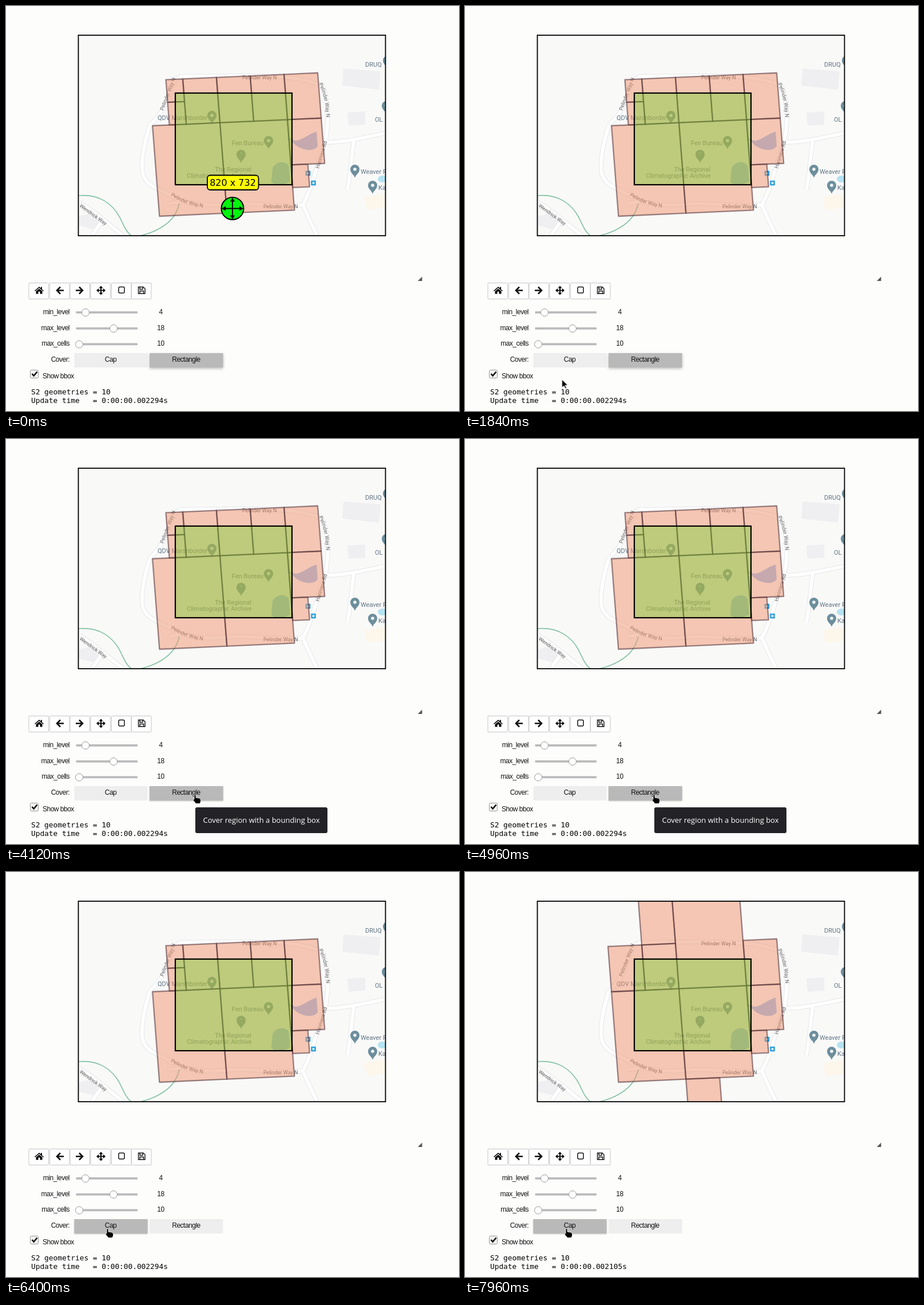
An HTML page that plays this animation: 792x707 px, repeating every 8 s.

```html
<!DOCTYPE html>
<html lang="en">
<head>
<meta charset="utf-8">
<title>Map covering demo</title>
<style>
html, body { margin: 0; width: 100%; height: 100%; overflow: hidden; background: #fdfdfc; }
svg { display: block; width: 792px; height: 707px; }
text { white-space: pre; }

.ui text { font: 12px "Liberation Sans", Arial, sans-serif; letter-spacing: -.5px; fill: #111; }
.end { text-anchor: end; }
.mid { text-anchor: middle; }
.out text { font: 12.8px "DejaVu Sans Mono", monospace; }
.place text { font: 11px Roboto, sans-serif; fill: #5f7484; }
.street text { font: 9px Roboto, sans-serif; fill: #606060; }
.edge { fill: none; stroke: #e6e7ea; stroke-width: 8; }
.road { fill: none; stroke: #fefefe; stroke-width: 6; }
.cell { fill: rgba(240, 148, 112, .5); stroke: rgba(65, 35, 45, .52); stroke-width: 2.3; stroke-linejoin: round; }
.icon { fill: none; stroke: #111; stroke-width: 2.6; }

/* One 8 s loop; stepped parts change hard, the pointer glides. */
.step { animation: 8s step-end infinite; }
.popup { animation-name: popup; }
.tip { animation-name: tip; }
.capBtn { animation-name: capBtn; }
.rectBtn { animation-name: rectBtn; }
.before { animation-name: before; }
.after { animation-name: after; }
.oldTime { animation-name: oldTime; }
.newTime { animation-name: newTime; }
.arrow { animation-name: arrow; }
.hand { animation-name: hand; }
.pointer { animation: move 8s linear infinite; }

@keyframes popup { 0% { visibility: visible } 10.5%, to { visibility: hidden } }
@keyframes tip { 0% { visibility: hidden } 36.5% { visibility: visible } 64.5%, to { visibility: hidden } }
@keyframes before { 0% { visibility: visible } 93.5%, to { visibility: hidden } }
@keyframes after { 0% { visibility: hidden } 93.5%, to { visibility: visible } }
@keyframes oldTime { 0% { visibility: visible } 81%, to { visibility: hidden } }
@keyframes newTime { 0% { visibility: hidden } 81%, to { visibility: visible } }
@keyframes arrow { 0% { visibility: visible } 26.5%, to { visibility: hidden } }
@keyframes hand { 0% { visibility: hidden } 26.5%, to { visibility: visible } }
@keyframes capBtn {
  0% { fill: #eee; filter: none }
  66% { fill: #eee; filter: drop-shadow(0 2px 2px #0004) }
  80%, to { fill: #b9b9b9; filter: drop-shadow(0 1px 1px #0004) }
}
@keyframes rectBtn {
  0% { fill: #b9b9b9; filter: drop-shadow(0 2px 2.5px #0004) }
  27% { fill: #b9b9b9; filter: drop-shadow(0 1px 1px #0004) }
  64.5% { fill: #b9b9b9; filter: drop-shadow(0 2px 2.5px #0004) }
  80%, to { fill: #eee; filter: none }
}
@keyframes move {
  0%, 20% { transform: translate(-16px, 690px); animation-timing-function: ease-out }
  28%, 64% { transform: translate(326px, 620px); animation-timing-function: ease-in-out }
  66.5%, to { transform: translate(173px, 622px) }
}
</style>
</head>
<body>
<svg viewBox="0 0 792 707">
  <defs>
    <clipPath id="frame"><rect x="127" y="51" width="536" height="350"/></clipPath>
    <path id="pin" d="M0 11C-1.500 5-8 3-8-4A8 8 0 0 1 8-4C8 3 1.500 5 0 11Z" fill="#6d8e9c"/>
    <path id="ring" d="M252 207C246 225 237 255 238 285C239 312 265 318 285 329C315 350 365 349 400 345C445 344 480 352 519 347C535 320 545 270 558 238C566 200 563 160 553 140C520 122 460 122 400 122L305 123C282 130 290 175 252 207"/>
    <path id="east" d="M558 238C590 238 625 230 663 222M608 235C604 260 603 290 597 320M519 347C528 368 536 385 544 401"/>
    <path id="west" d="M127 342C155 358 180 382 205 401M150 401L168 375M285 345L305 342"/>
    <path id="eastName" d="M547 136Q560 160 560 200"/>
    <path id="southName" d="M288 331Q308 346 352 353"/>
  </defs>

  <g clip-path="url(#frame)">
    <rect x="127" y="51" width="536" height="350" fill="#f9f9f8"/>
    <path d="M590 109L655 114L652 146L588 139ZM597 186L628 184V207L599 209ZM127 367L150 362L166 375L152 390L127 383Z" fill="#efeff2"/>
    <path d="M625 334L663 328V352L632 356Z" fill="#fdf6ea"/>
    <g class="edge"><use href="#ring"/><use href="#east"/><use href="#west"/></g>
    <g class="road"><use href="#ring"/><use href="#east"/><use href="#west"/></g>
    <path d="M127 331C163 328 186 345 199 369C207 386 211 395 219 401M235 401C258 396 283 383 294 366Q300 357 303 345" fill="none" stroke="#82c3a2" stroke-width="1.6"/>
    <path d="M491 229L505 235C516 236 524 226 543 219L545 245C538 254 522 253 508 244ZM466 283C472 271 487 270 494 278L497 306C485 314 471 315 464 307Z" fill="#9cbff0"/>
    <ellipse cx="658" cy="302" rx="8" ry="6" fill="#b5e3f2"/>

    <g class="street">
      <text x="413" y="128">Pelinder Way N</text>
      <text transform="translate(275 183) rotate(-69)">Pelinder Way N</text>
      <text><textPath href="#eastName">Pelinder Way N</textPath></text>
      <text><textPath href="#southName">Pelinder Way N</textPath></text>
      <text x="450" y="353">Pelinder Way N</text>
      <text transform="translate(547 284) rotate(-73)">Hanmere Rd</text>
      <text transform="translate(128 350) rotate(36)">Wendrick Way</text>
    </g>
    <g class="place">
      <text x="265" y="199">QDV Marshborder</text>
      <text x="395" y="243">Fen Bureau</text>
      <text class="mid" x="397" y="289">The Regional</text>
      <text class="mid" x="373" y="300">Climatographic Archive</text>
      <text x="628" y="106">DRUQ</text>
      <text x="645" y="202">OL</text>
      <text x="620" y="293">Weaver F</text>
      <text x="651" y="321">Ka</text>
    </g>
    <g id="pins"></g>
    <path d="M408 257q2-1 3 1q1-2 3-1v5q-2-1-3 1q-1-2-3-1Z" fill="#6d8e9c"/>
    <g fill="#fff" stroke="#28a0dc" stroke-width="2.500">
      <rect x="525" y="289" width="6" height="6"/><rect x="534.500" y="306" width="6" height="6"/>
    </g>

    <g id="before" class="step before"></g>
    <g id="after" class="step after"></g>
    <rect x="296" y="152" width="204" height="160" fill="rgba(108,208,42,.4)" stroke="#000" stroke-width="2.200"/>
  </g>
  <rect x="126.500" y="51" width="537" height="350" fill="none" stroke="#000" stroke-width="1.800"/>

  <g class="step popup" stroke="#000">
    <rect x="352" y="295.500" width="89.500" height="25.500" rx="5" fill="#ff0" stroke-width="1.800"/>
    <text class="mid" x="396.500" y="314" stroke="none" font-size="16" font-family="DejaVu Sans, sans-serif">820 x 732</text>
    <g transform="translate(396 353.500)">
      <circle r="19.500" fill="#00f50c" stroke-width="2"/>
      <path d="M-16 0H16M0-16V16" stroke-width="2"/>
      <path d="M-19 0l7-4v8ZM19 0l-7-4v8ZM0-19l-4 7h8ZM0 19l-4-7h8Z" stroke="none"/>
    </g>
  </g>

  <path d="M727.500 472.500V480H720Z" fill="#555"/>

  <g id="toolbar" fill="#fff" stroke="#c6c6c8"></g>
  <path d="M58 490l-8 7 1 1 7-6 7 6 1-1-3-2.600v-4h-2v2ZM52.500 498l5.500-4.500 5.500 4.500v4.500h-4v-4h-3v4h-4Z"/>
  <path class="icon" d="M101 496.500H90M95 490.500l-6 6 6 6M122 496.500h11M128 490.500l6 6-6 6"/>
  <path class="icon" style="stroke-width:2" d="M160 496.500h12M166 490.500v12"/>
  <path d="M158 496.500l4-3.500v7ZM174 496.500l-4-3.500v7ZM166 488.500l-3.500 4h7ZM166 504.500l-3.500-4h7Z"/>
  <rect class="icon" style="stroke-width:1.500" x="197" y="490.500" width="10" height="10.500" rx="2"/>
  <path class="icon" style="stroke-width:1.400" d="M231.500 490.500h8.500l3 3v8.500h-11.500ZM234 490.500v4h5v-4M234 502v-4.500h6.500v4.500"/>

  <g class="ui">
    <g id="sliders"></g>
    <text class="end" x="111" y="621">Cover:</text>
    <rect class="step capBtn" x="119.500" y="606" width="128" height="25"/>
    <rect class="step rectBtn" x="251" y="606" width="128.500" height="25"/>
    <text class="mid" x="183" y="621">Cap</text>
    <text class="mid" x="315" y="621">Rectangle</text>
    <rect x="42.500" y="635.500" width="14" height="14" rx="2" fill="#f2f2f2" stroke="#999"/>
    <path class="icon" d="M45.500 642l3 3.500 6-7"/>
    <text x="64" y="650">Show bbox</text>
  </g>

  <g class="out">
    <text x="44" y="678">S2 geometries = 10</text>
    <text class="step oldTime" x="44" y="693">Update time   = 0:00:00.002294s</text>
    <text class="step newTime" x="44" y="693">Update time   = 0:00:00.002105s</text>
  </g>

  <g class="step tip">
    <rect x="331" y="643" width="231" height="45" rx="3" fill="#232327"/>
    <text class="mid" x="446.500" y="670" fill="#fff" font-size="13" font-family="Open Sans, Noto Sans, sans-serif">Cover region with a bounding box</text>
  </g>

  <g class="pointer" stroke="#fff" stroke-width=".8" stroke-linejoin="round">
    <path class="step arrow" d="M0 0V14l3.500-3 2.500 5 2-1-2.500-5H10Z"/>
    <path class="step hand" d="M3 1.500Q4.500-.5 6 1.500V6l6 1q2.500.5 2.500 3v2.500l-1.500 4H6L1.500 11Q0 8.500 3 9Z"/>
  </g>
</svg>

<script>
const SVG = "http://www.w3.org/2000/svg";

function add(parentId, tag, attrs, text = "") {
  const node = document.createElementNS(SVG, tag);
  for (const key in attrs) node.setAttribute(key, attrs[key]);
  node.textContent = text;
  document.getElementById(parentId).append(node);
}

// Cells lie on a slightly skewed lattice: column, row, size.
const corner = (i, j) => [250 + 59 * i + 6.1 * j, 130 - 2.65 * i + 79 * j];
function addCell(id, [i, j, size]) {
  const points = [[0, 0], [size, 0], [size, size], [0, size]].map(([x, y]) => corner(i + x, j + y));
  add(id, "polygon", { class: "cell", points: points.join(" ") });
}

const shared = [[4, 0, 1], [0, 1, 2], [2, 1, 2], [4, 1, 1], [4, 2, .5], [1, 0, 1]];
const rectCover = [[.5, 0, .5], [.5, .5, .5], [2, 0, 1], [3, 0, 1]];
const capCover = [[0, 0, 1], [1, -1, 1], [2, -1, 2], [2, 3, 1]];
[...shared, ...rectCover].forEach(cell => addCell("before", cell));
[...shared, ...capCover].forEach(cell => addCell("after", cell));

for (const [x, y] of [[360, 195], [459, 239], [411, 263], [610, 289], [641, 317], [667, 99], [665, 178]]) {
  add("pins", "use", { href: "#pin", x, y });
  add("pins", "circle", { cx: x, cy: y - 4, r: 2.8, fill: "#f4f7f8" });
}

for (const x of [40, 76.5, 112, 148, 184.5, 219.5]) {
  add("toolbar", "rect", { x, y: 483.5, width: 34.5, height: 28, rx: 1 });
}

const sliders = [["min_level", 4, 139, 535], ["max_level", 18, 188, 563], ["max_cells", 10, 128, 590.5]];
for (const [label, value, x, y] of sliders) {
  add("sliders", "text", { class: "end", x: 111, y: y + 2.8 }, label);
  add("sliders", "rect", { x: 122.5, y: y - 2, width: 107.5, height: 3.8, rx: 1, fill: "#bababc" });
  add("sliders", "circle", { cx: x, cy: y, r: 6.5, fill: "#fff", stroke: "#999" });
  add("sliders", "text", { class: "mid", x: 270.5, y: y + 2.8 }, value);
}
</script>
</body>
</html>
```
